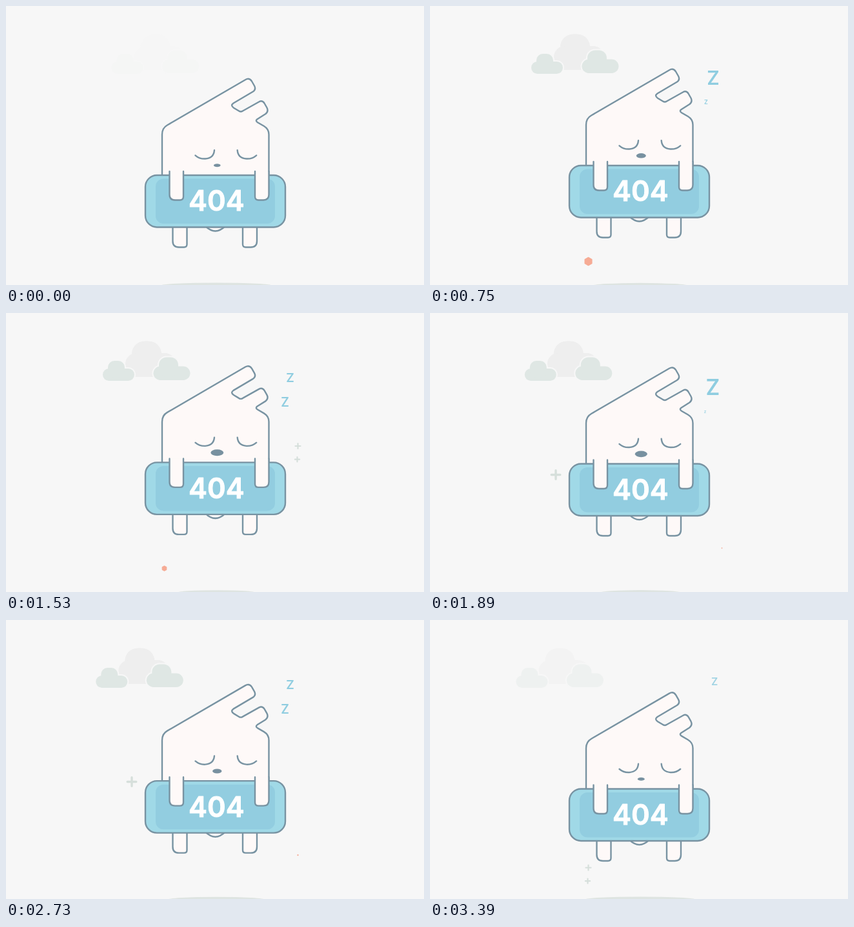
Write an HTML page that moves like this. It is 648 px wide and 432 px high and loops after 3.42 s.

```html
<!DOCTYPE html>
<html lang="en">
<head>
<meta charset="utf-8">
<title>404</title>
<style>
  html, body { margin: 0; width: 100%; height: 100%; overflow: hidden; background: #f7f7f7; }
  svg { display: block; width: 648px; height: 432px; }
  text { font-family: Inter, Lato, sans-serif; font-weight: 600; text-anchor: middle; }
  .line { fill: none; stroke: #7893a2; stroke-width: 2.4; stroke-linecap: round; stroke-linejoin: round; }
  .skin { fill: #fef9f8; }
  .puff { fill: #dfe7e4; }
  .rim { fill: #f7f7f7; stroke: #f7f7f7; stroke-width: 4; }
  .z { fill: #8fcde0; font-size: 37px; }
  .dot { fill: #f6ab95; stroke: #f6ab95; stroke-width: 2; stroke-linejoin: round; }
  .plus { fill: none; stroke: #d6dfdb; stroke-linecap: round; }
</style>
</head>
<body>
<svg viewBox="0 0 648 432">
  <defs>
    <g id="left">
      <rect x="150" y="86" width="49" height="19" rx="9.5"/>
      <rect x="158" y="74" width="26" height="26" rx="10"/>
    </g>
    <g id="right">
      <rect x="228.5" y="82.5" width="57" height="21.5" rx="10.7"/>
      <rect x="237" y="68.5" width="30" height="30" rx="12"/>
    </g>
    <path id="eye" d="M293.5 231.3Q300 237 309 236.5Q322 235.6 323 223.3"/>
    <path id="arm" d="M253.5 256V292Q253.5 300.5 262 300.5H269.5Q275 300.5 275 295V256"/>
    <path id="leg" d="M258.5 335V364Q258.5 373.5 268 373.5H276Q280.5 373.5 280.5 369V335"/>
  </defs>

  <g id="clouds">
    <g fill="#eee">
      <rect x="195" y="43.5" width="46" height="55" rx="20"/>
      <rect x="185" y="62" width="78" height="37" rx="17"/>
    </g>
    <use href="#left" class="rim"/><use href="#left" class="puff"/>
    <use href="#right" class="rim"/><use href="#right" class="puff"/>
  </g>

  <ellipse id="shadow" cx="326" cy="433" fill="#dee4e1"/>

  <g id="sparks"></g>

  <g id="hero">
    <g class="line skin">
      <use href="#leg"/>
      <use href="#leg" transform="matrix(-1 0 0 1 647.5 0)"/>
      <path d="M309 341Q324.5 356 340 341"/>
      <path d="M242 300V199Q242 189 250 184.5L371 114.2Q377 110.7 381 116.5L385 123.5Q388 129 383 132.5L352.5 150.5Q347.5 154 353 157.7L361 162.5Q364 164.5 367 162.5L392 148.5Q397.3 145.5 400.5 150.5L404.5 157.5Q407.3 163 402.5 167L389.5 175.2Q386 177.7 390 180.2L400 186Q407.5 190.5 407.5 199V300"/>
    </g>
    <g class="line">
      <use href="#eye"/>
      <use href="#eye" transform="matrix(-1 0 0 1 681.7 0)"/>
    </g>
    <ellipse id="nose" cx="327.3" cy="246.8" fill="#7891a0"/>
    <rect class="line" x="216" y="262" width="217" height="80.5" rx="18" style="fill:#a0d9e7"/>
    <rect x="232" y="267.5" width="185" height="69.5" rx="12" fill="#92cde0"/>
    <text x="326.3" y="317.4" font-size="43.5" fill="#fff" stroke="#fff" stroke-linejoin="round">404</text>
    <g class="line skin">
      <use href="#arm"/>
      <use href="#arm" transform="matrix(-1 0 0 1 661 0)"/>
    </g>
  </g>

  <g id="zs"></g>
</svg>
<script>
  const LOOP = 3420, TURN = 1650;
  const Z_GAP = 600, Z_LIFE = 1260;
  const SPARK_GAP = 833, SPARK_LIFE = 340;

  const $ = id => document.getElementById(id);
  const lerp = (a, b, k) => a + (b - a) * k;
  const clamp = k => Math.min(1, Math.max(0, k));
  const set = (el, attrs) => {
    for (const name in attrs) el.setAttribute(name, attrs[name]);
    return el;
  };
  const add = (parent, tag, attrs) =>
    parent.appendChild(set(document.createElementNS('http://www.w3.org/2000/svg', tag), attrs));
  const show = (el, on) => el.setAttribute('visibility', on ? 'visible' : 'hidden');

  const zs = Array.from({ length: 5 }, () => {
    const el = add($('zs'), 'text', { class: 'z', y: 13.5 });
    el.textContent = 'Z';
    return el;
  });

  function addPlus(parent, x, y, r, width) {
    return add(parent, 'path', {
      class: 'plus', 'stroke-width': width,
      d: `M${x - r} ${y}h${2 * r}M${x} ${y - r}v${2 * r}`
    });
  }

  // x, y, first start
  const sparks = [[195, 250.5, 25], [452.5, 364, 205], [452.5, 218, 405], [245.5, 395.5, 605]]
    .map(([x, y, start]) => {
      const g = add($('sparks'), 'g', { transform: `translate(${x} ${y})` });
      return {
        start,
        dot: add(g, 'path', { class: 'dot', d: 'M0-6L5.2-3V3L0 6L-5.2 3V-3Z' }),
        big: addPlus(g, 0, 0, 6.8, 3.4),
        top: addPlus(g, 0, -12, 4, 2.2),
        low: addPlus(g, -1, 8.7, 3.6, 2.2)
      };
    });

  function drawHero(t) {
    const k = t < TURN ? t / TURN : (LOOP - t) / (LOOP - TURN);
    set($('hero'), { transform: `translate(0 ${-33 * k})` });
    set($('nose'), { rx: lerp(5.3, 10.2, k), ry: lerp(2.5, 5.2, k) });
    set($('shadow'), { rx: lerp(87, 59, k), ry: lerp(4.5, 3.8, k) });
  }

  function drawClouds(t) {
    const fadeIn = lerp(0.05, 1, clamp(t / 480));
    const fadeOut = lerp(1, 0.3, clamp((t - 3060) / 360));
    set($('clouds'), {
      transform: `translate(${13.65 - 0.00892 * t} 0)`,
      opacity: fadeIn * fadeOut
    });
  }

  function drawZ(el, age) {
    const on = age > 0 && age < Z_LIFE;
    show(el, on);
    if (!on) return;
    const half = Z_LIFE / 2;
    const x = age < 480 ? lerp(424, 436.5, age / 480) : lerp(436.5, 443.6, (age - 480) / 780);
    const y = lerp(158.8, 78.5, age / Z_LIFE);
    set(el, {
      transform: `translate(${x} ${y}) scale(${1 - Math.abs(age - half) / half})`,
      opacity: clamp((1200 - age) / 250)
    });
  }

  function drawSpark(s, t) {
    const since = t - s.start;
    const age = since < 0 || since > 4 * SPARK_GAP ? -1 : since % SPARK_GAP;
    show(s.dot, age > 0 && age < 185);
    show(s.big, age >= 185 && age < 260);
    show(s.top, age >= 208 && age < SPARK_LIFE);
    show(s.low, age >= 260 && age < SPARK_LIFE);
    set(s.dot, { transform: `scale(${clamp(age / 150)})` });
  }

  function frame() {
    const t = performance.now() % LOOP;
    drawHero(t);
    drawClouds(t);
    zs.forEach((el, i) => drawZ(el, t - i * Z_GAP));
    sparks.forEach(s => drawSpark(s, t));
    requestAnimationFrame(frame);
  }
  frame();
</script>
</body>
</html>
```
